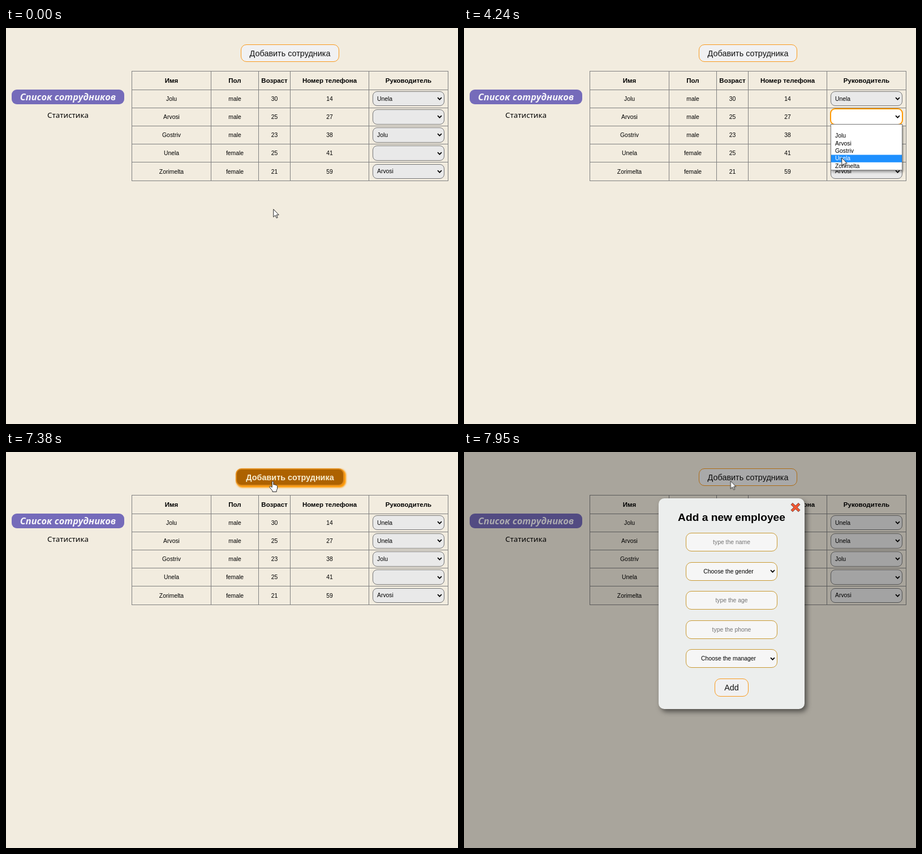
These frames come from a looping animation (799 px wide and 701 px high, 8000 ms). An HTML page:

```html
<!DOCTYPE html>
<html lang="ru">
<head>
<meta charset="utf-8">
<title>Список сотрудников</title>
<style>
html, body { margin: 0; width: 100%; height: 100%; overflow: hidden; }
body { position: relative; background: #f2ecdf; color: #000; font: 10.4px "Liberation Sans", Arial, sans-serif; }
* { box-sizing: border-box; }
div, svg { position: absolute; white-space: pre; }
.mid { display: flex; align-items: center; justify-content: center; }
.head { font-size: 11.5px; font-weight: 700; }
.nav { font: 13.3px "Noto Sans", "Open Sans", sans-serif; }
.current { border-radius: 9px; background: #756bba; color: #f6f5fa; font-size: 16.4px; font-weight: 700; font-style: italic; }
.select { display: flex; align-items: center; padding-left: 7px; border: 1px solid #777; border-radius: 8px; background: #e9e9e9; }
.select svg, .field svg { right: 3px; top: calc(50% - 3px); }
.focus { border: 2px solid #ff9800; border-radius: 9px; background: #fff; }
.button { border: 1px solid #f99a1c; border-radius: 10px; background: #f1f1f2; color: #111; font-size: 14.4px; }
.list { left: 648px; top: 170px; width: 127px; height: 82px; border: 1px solid #777; background: #fff; box-shadow: 2px 3px 4px rgba(0,0,0,.35); }
.options { inset: 0; padding-left: 7px; line-height: 13.35px; }
.hot { background: #1e90ff; color: #fff; --k: 0;
  clip-path: inset(calc(var(--k) * 13.35px) 0 calc(80px - (var(--k) + 1) * 13.35px) 0); }
.shade { inset: 0; background: rgba(0,0,0,.3); }
.modal { left: 344px; top: 82px; width: 258px; height: 373px; border-radius: 10px; background: #eceeed; box-shadow: 4px 5px 9px rgba(0,0,0,.5); }
.title { font-size: 19.2px; font-weight: 700; }
.field { border: 1px solid #c99a33; border-radius: 10px; background: #f6f6f6; }
.hint { color: #757575; }
.choice { padding-right: 11px; }
.cursor { left: 0; top: 0; overflow: visible; fill: #fff; stroke: #222; }

.add { animation: wide 8s step-end infinite, hover 8s ease infinite; }
.list { animation: list 8s step-end infinite; }
.hot { animation: pick 8s step-end infinite; }
.focus { animation: focus 8s step-end infinite; }
.chosen { animation: chosen 8s step-end infinite; }
.shade { animation: shade 8s step-end infinite; }
.modal { animation: drop 8s ease-out infinite; }
.cursor { animation: travel 8s step-end infinite; }
.hand { animation: hand 8s step-end infinite; }
.arrow { animation: arrow 8s step-end infinite; }

@keyframes list { 0% { opacity: 0 } 34.125% { opacity: 1 } 61.75%, 100% { opacity: 0 } }
@keyframes focus { 0% { opacity: 0 } 34.125% { opacity: 1 } 70.375%, 100% { opacity: 0 } }
@keyframes chosen { 0% { opacity: 0 } 61.75%, 100% { opacity: 1 } }
@keyframes shade { 0% { opacity: 0 } 93%, 100% { opacity: 1 } }
@keyframes hand { 0% { opacity: 0 } 79.0875% { opacity: 1 } 93%, 100% { opacity: 0 } }
@keyframes arrow { 0% { opacity: 1 } 79.0875% { opacity: 0 } 93%, 100% { opacity: 1 } }
@keyframes pick {
  0% { --k: 0 } 44.525% { --k: 1 } 46.725% { --k: 2 } 48.9% { --k: 3 } 50.75%, 100% { --k: 4 }
}
@keyframes wide {
  0% { left: 415px; width: 174px; font-weight: 400 }
  80.3% { left: 406px; width: 192px; font-weight: 700 }
  93.6%, 100% { left: 415px; width: 174px; font-weight: 400 }
}
@keyframes hover {
  0%, 79.0875%, 96.25%, 100% { background: #f1f1f2; color: #111; border: 1px solid #f99a1c; box-shadow: 0 0 0 0 #ff9800 }
  82.375%, 92.625% { background: #ad6200; color: #f8edcf; border: 2px solid #e08b1b; box-shadow: 2px 2px 3px 1px #ff9800 }
}
@keyframes drop { 0%, 93% { translate: 0 -490px } 98.75%, 100% { translate: 0 0 } }
@keyframes travel {
  0% { translate: 472px 320px }
  8.25% { translate: 472px 320px; animation-timing-function: steps(3) }
  11.575% { translate: 384px 347px; animation-timing-function: steps(7) }
  19.25% { translate: 555px 303px; animation-timing-function: steps(4) }
  23.6% { translate: 612px 228px; animation-timing-function: steps(5) }
  29% { translate: 703px 157px }
  39.025% { translate: 703px 157px; animation-timing-function: steps(10) }
  50% { translate: 669px 224px }
  50.75% { translate: 668px 226px }
  51.875% { translate: 667px 227px }
  53% { translate: 667px 229px }
  60.65% { translate: 667px 229px; animation-timing-function: steps(7) }
  68.375% { translate: 580px 283px }
  72.525% { translate: 580px 283px; animation-timing-function: steps(2) }
  74.7125% { translate: 535px 294px }
  75.8125% { translate: 508px 288px; animation-timing-function: steps(3) }
  79.0875% { translate: 470px 52px }
  84.375% { translate: 470px 51px }
  93%, 100% { translate: 470.5px 50.5px }
}
</style>
</head>
<body>
<script>
const picked = `<span class="chosen">Unela</span>`;
const people = [
  ["Jolu", "male", 30, 14, "Unela"],
  ["Arvosi", "male", 25, 27, picked],
  ["Gostriv", "male", 23, 38, "Jolu"],
  ["Unela", "female", 25, 41, ""],
  ["Zorimelta", "female", 21, 59, "Arvosi"]
];
const heads = ["Имя", "Пол", "Возраст", "Номер телефона", "Руководитель"];
const cols = [222, 362, 446, 502, 641, 781];
const rowY = i => 76.8 + i * 32.2;
const chevron = `<svg width="9" height="7" fill="none" stroke="#000" stroke-width="1.7"><path d="M1 1.2l3.5 3.5 3.5-3.5"/></svg>`;

const box = (x, y, w, h, cls, inner = "") =>
  `<div class="${cls}" style="left:${x}px;top:${y}px;width:${w}px;height:${h}px">${inner}</div>`;

const cell = (text, row, col, cls = "") =>
  box(cols[col], rowY(row), cols[col + 1] - cols[col] + 1, 32.6, "mid " + cls, text);

const select = (name, i) => box(648, rowY(i + 1) + 2.8, 127, 26.6, "select", name + chevron);

const gridLines = () => {
  let d = "";
  for (const x of cols) d += `M${x + .5} 76V270`;
  for (let i = 0; i < 7; i++) d += `M222 ${Math.floor(rowY(i)) + .5}H782`;
  return `<svg width="799" height="701" fill="none" stroke="#808080"><path d="${d}"/></svg>`;
};

const table = () => gridLines() +
  heads.map((h, c) => cell(h, 0, c, "head")).join("") +
  people.map((p, r) =>
    p.slice(0, 4).map((v, c) => cell(v, r + 1, c)).join("") + select(p[4], r)).join("");

const dropdown = () => {
  const names = ["", ...people.map(p => p[0])].map(n => n || " ").join("\n");
  return `<div class="list"><div class="options">${names}</div><div class="options hot">${names}</div></div>`;
};

const field = (text, i) => {
  const choice = text.startsWith("Choose");
  return box(48, 61 + i * 51.5, 162, 33, "mid field " + (choice ? "choice" : "hint"), text + (choice ? chevron : ""));
};

const cross = `<svg style="left:233px;top:7px" width="18" height="18" stroke-linecap="square">
  <path d="M4 4.2L14 13.8M14 4.2L4 13.8" stroke="#7b4a45" stroke-width="5"/>
  <path d="M4 4.2L14 13.8M14 4.2L4 13.8" stroke="#f4562f" stroke-width="3.4"/></svg>`;

const modal = () => `<div class="modal">` + cross +
  box(0, 20, 258, 28, "mid title", "Add a new employee") +
  ["type the name", "Choose the gender", "type the age", "type the phone", "Choose the manager"].map(field).join("") +
  box(99, 318.5, 60, 32, "mid button", "Add") + `</div>`;

const cursor = `<svg class="cursor" width="20" height="22">
  <path class="arrow" d="M.8 .8V14.6L4 11.6L6.2 16.4L8.2 15.5L6.1 10.9H10.3Z"/>
  <path class="hand" d="M.2 11.5V2.2c0-2 2.7-2 2.7 0V7c.8-.9 2.3-.6 2.6.4 .9-.6 2.1-.2 2.3.8 1-.4 1.9.2 1.9 1.4V13c0 1.8-1.2 2.6-1.5 4.2v2.2H1V17.6C-.4 16-2.3 13.6-3.8 11.4c-.8-1.4.9-2.4 2-1.3z"/></svg>`;

document.body.insertAdjacentHTML("beforeend",
  box(10, 109, 199, 25.5, "mid nav current", "Список сотрудников") +
  box(10, 141, 199, 25, "mid nav", "Статистика") +
  box(415, 29, 174, 31, "mid button add", "Добавить сотрудника") +
  table() +
  box(647, 142, 129, 30, "select focus", picked + chevron) +
  dropdown() +
  `<div class="shade"></div>` + modal() + cursor);
</script>
</body>
</html>
```
